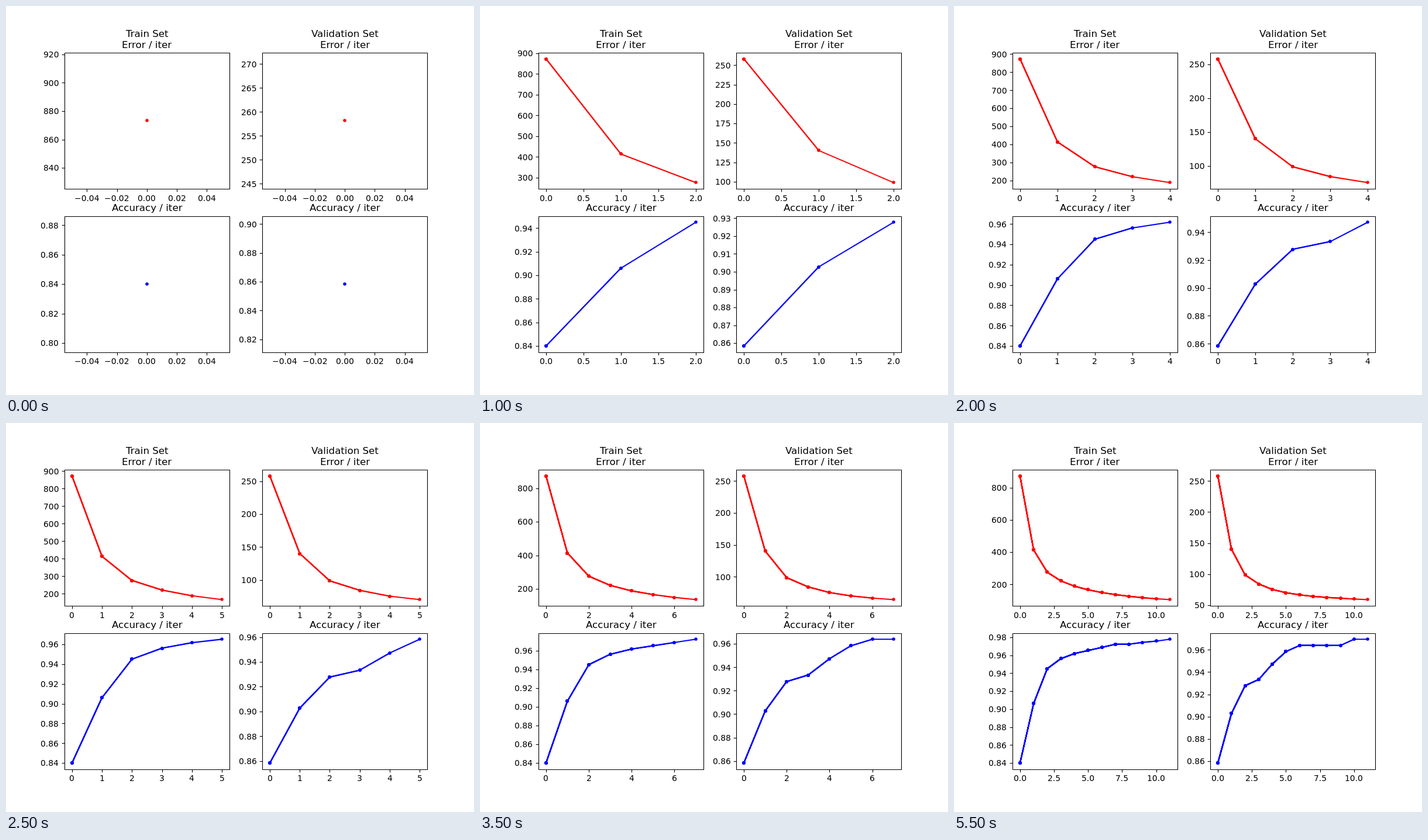
An HTML page with a canvas that plays this animation: 800x666 px, repeating every 6000 ms.

```html
<!DOCTYPE html>
<html lang="en">
<head>
<meta charset="utf-8">
<title>Training curves</title>
<style>
  html, body { margin: 0; width: 100%; height: 100%; overflow: hidden; background: #fff; }
  canvas { display: block; }
</style>
</head>
<body>
<canvas id="stage" width="800" height="666"></canvas>
<script>
const ctx = document.getElementById('stage').getContext('2d');
const STEP = 500, COUNT = 12, WIDTH = 281.82, HEIGHT = 233.1;
const LEFT = [100, 438.18], TOP = [79.92, 359.64];

const over = (counts, total) => counts.map(n => n / total);
const charts = [
  { col: 0, row: 0, color: '#f00', title: ['Train Set', 'Error / iter'],
    data: [873.2, 414, 276, 221.2, 188.5, 166.5, 149.3, 136.2, 126, 117, 110.5, 105] },
  { col: 1, row: 0, color: '#f00', title: ['Validation Set', 'Error / iter'],
    data: [258.15, 140.2, 98.8, 84.3, 75.4, 70.2, 66.7, 64.3, 62.6, 61.3, 60, 59] },
  { col: 0, row: 1, color: '#00f', title: ['Accuracy / iter'],
    data: over([1207, 1302, 1358, 1374, 1382, 1387, 1392, 1397, 1397, 1400, 1402, 1405], 1437) },
  { col: 1, row: 1, color: '#00f', title: ['Accuracy / iter'],
    data: over([309, 325, 334, 336, 341, 345, 347, 347, 347, 347, 349, 349], 360) }
];

// Data range with a 5% margin; a single value is widened first.
function limits(values) {
  let lo = Math.min(...values), hi = Math.max(...values);
  if (lo === hi) {
    const pad = 0.05 * (Math.abs(lo) || 1);
    lo -= pad;
    hi += pad;
  }
  const margin = (hi - lo) * 0.05;
  return [lo - margin, hi + margin];
}

// Round tick values, at most `bins` intervals, with their labels.
function ticks([lo, hi], bins) {
  const raw = (hi - lo) / bins;
  const power = Math.floor(Math.log10(raw));
  const lead = [1, 2, 2.5, 5, 10].find(s => s * 10 ** power >= raw);
  const step = lead * 10 ** power;
  const digits = Math.max(0, (lead === 2.5 ? 1 : lead === 10 ? -1 : 0) - power);
  const list = [];
  for (let i = Math.ceil(lo / step); i * step <= hi; i++) {
    list.push({ value: i * step, label: (i * step).toFixed(digits).replace('-', '\u2212') });
  }
  return list;
}

const snap = v => Math.floor(v + 0.5) + 0.5;

function text(str, x, y, size, align) {
  ctx.font = size + 'px "DejaVu Sans", sans-serif';
  ctx.fillStyle = '#000';
  ctx.fillText(str, Math.round(x - ctx.measureText(str).width * align), y);
}

function line(points) {
  ctx.beginPath();
  points.forEach(([x, y]) => ctx.lineTo(x, y));
  ctx.stroke();
}

function drawChart({ col, row, color, title, data }, count) {
  const left = LEFT[col], top = TOP[row], bottom = top + HEIGHT;
  const values = data.slice(0, count);
  const xLim = limits(values.map((_, i) => i)), yLim = limits(values);
  const px = v => left + (v - xLim[0]) / (xLim[1] - xLim[0]) * WIDTH;
  const py = v => bottom - (v - yLim[0]) / (yLim[1] - yLim[0]) * HEIGHT;
  const points = values.map((v, i) => [px(i), py(v)]);

  // Every step plots the whole curve again on top of the earlier ones.
  ctx.strokeStyle = ctx.fillStyle = color;
  ctx.lineWidth = 2.083;
  ctx.lineCap = 'square';
  ctx.lineJoin = 'round';
  for (let n = 1; n <= count; n++) {
    const part = points.slice(0, n);
    if (n > 1) line(part);
    for (const [x, y] of part) {
      ctx.beginPath();
      ctx.arc(Math.round(x), Math.round(y), 2.78, 0, 2 * Math.PI);
      ctx.fill();
    }
  }

  ctx.strokeStyle = '#000';
  ctx.lineWidth = 1.11;
  ctx.lineCap = 'butt';
  const x0 = snap(left), y1 = snap(bottom);
  for (const { value, label } of ticks(xLim, 6)) {
    const x = px(value);
    line([[snap(x), y1], [snap(x), y1 + 4.86]]);
    text(label, x, row ? 613 : 334, 13.889, 0.5);
  }
  for (const { value, label } of ticks(yLim, 8)) {
    const y = py(value);
    line([[x0, snap(y)], [x0 - 4.86, snap(y)]]);
    text(label, left - 9.72, Math.round(y + 5.4), 13.889, 1);
  }
  ctx.strokeRect(x0, snap(top), snap(left + WIDTH) - x0, y1 - snap(top));

  const base = row ? 351 : 72;
  title.forEach((str, i) =>
    text(str, left + WIDTH / 2, base - 19 * (title.length - 1 - i), 16.667, 0.5));
}

let shown = 0;
function frame(now) {
  const count = Math.floor(now / STEP) % COUNT + 1;
  if (count !== shown) {
    shown = count;
    ctx.fillStyle = '#fff';
    ctx.fillRect(0, 0, 800, 666);
    charts.forEach(chart => drawChart(chart, count));
  }
  requestAnimationFrame(frame);
}
frame(performance.now());
</script>
</body>
</html>
```
